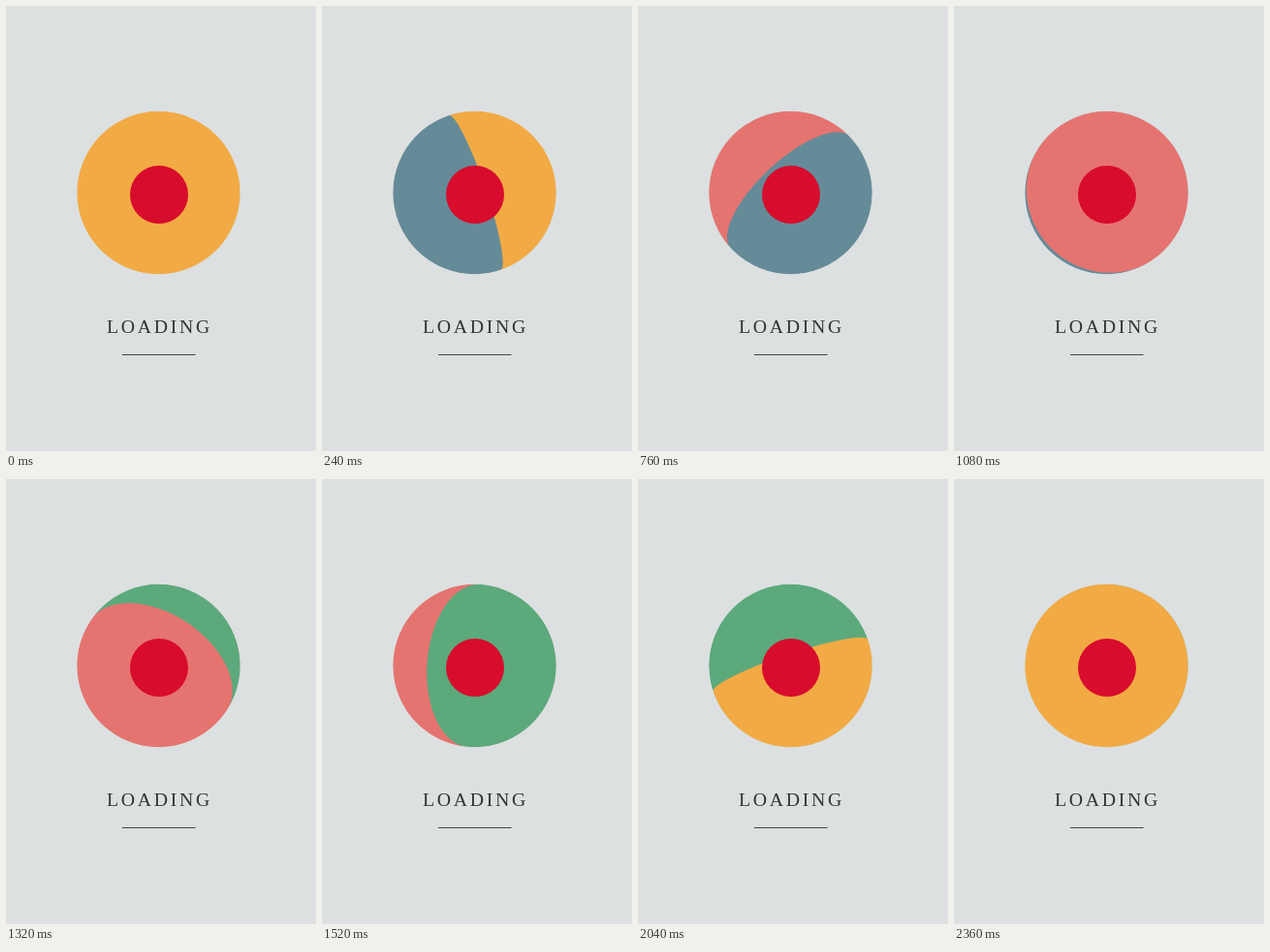
An HTML page for the animation above (2.4 s loop, 320 px wide and 460 px high).

```html
<!DOCTYPE html>
<html lang="en">
<head>
<meta charset="utf-8">
<title>Loading</title>
<style>
  html, body { margin: 0; height: 100%; overflow: hidden; background: #dce0e1; }
  svg { display: block; }
  text { font: 19.8px "Liberation Serif", "Times New Roman", serif; letter-spacing: 2.7px; fill: #333; }
</style>
</head>
<body>
<svg width="320" height="460" viewBox="0 0 320 460">
  <g transform="translate(157.5 193)">
    <circle id="disc" r="84.5"/>
    <path id="fold"/>
    <circle r="85" fill="none" stroke="#dce0e1" stroke-width="1.6"/>
  </g>
  <circle cx="158" cy="195" r="30" fill="#d80c2c"/>
  <text x="104" y="338">LOADING</text>
  <path d="M120 360.5H195.5" stroke="#444"/>
</svg>
<script>
const COLORS = ['#f2aa44', '#658b98', '#e57470', '#5ca97c'];
const LOOP = 2400, PHASE = LOOP / COLORS.length, R = 84.5;
const disc = document.getElementById('disc');
const fold = document.getElementById('fold');

// The next colour folds across the disc while the fold axis turns.
function draw(now) {
  const time = now % LOOP;
  const phase = Math.floor(time / PHASE);
  const t = time / PHASE - phase;
  const turn = t + 0.16 * Math.sin(Math.PI * t) - 0.015 * Math.sin(2 * Math.PI * t);
  const width = Math.cos(Math.PI * turn) * R;
  const angle = 90 * phase - 98 + 217 * t - 48 * t * t;

  disc.setAttribute('fill', COLORS[phase]);
  fold.setAttribute('fill', COLORS[(phase + 1) % COLORS.length]);
  fold.setAttribute('transform', `rotate(${angle})`);
  fold.setAttribute('d',
    `M0 ${R}A${R} ${R} 0 0 1 0 ${-R}A${Math.abs(width)} ${R} 0 0 ${width > 0 ? 0 : 1} 0 ${R}Z`);
}

function tick() {
  draw(performance.now());
  requestAnimationFrame(tick);
}
tick();
</script>
</body>
</html>
```
